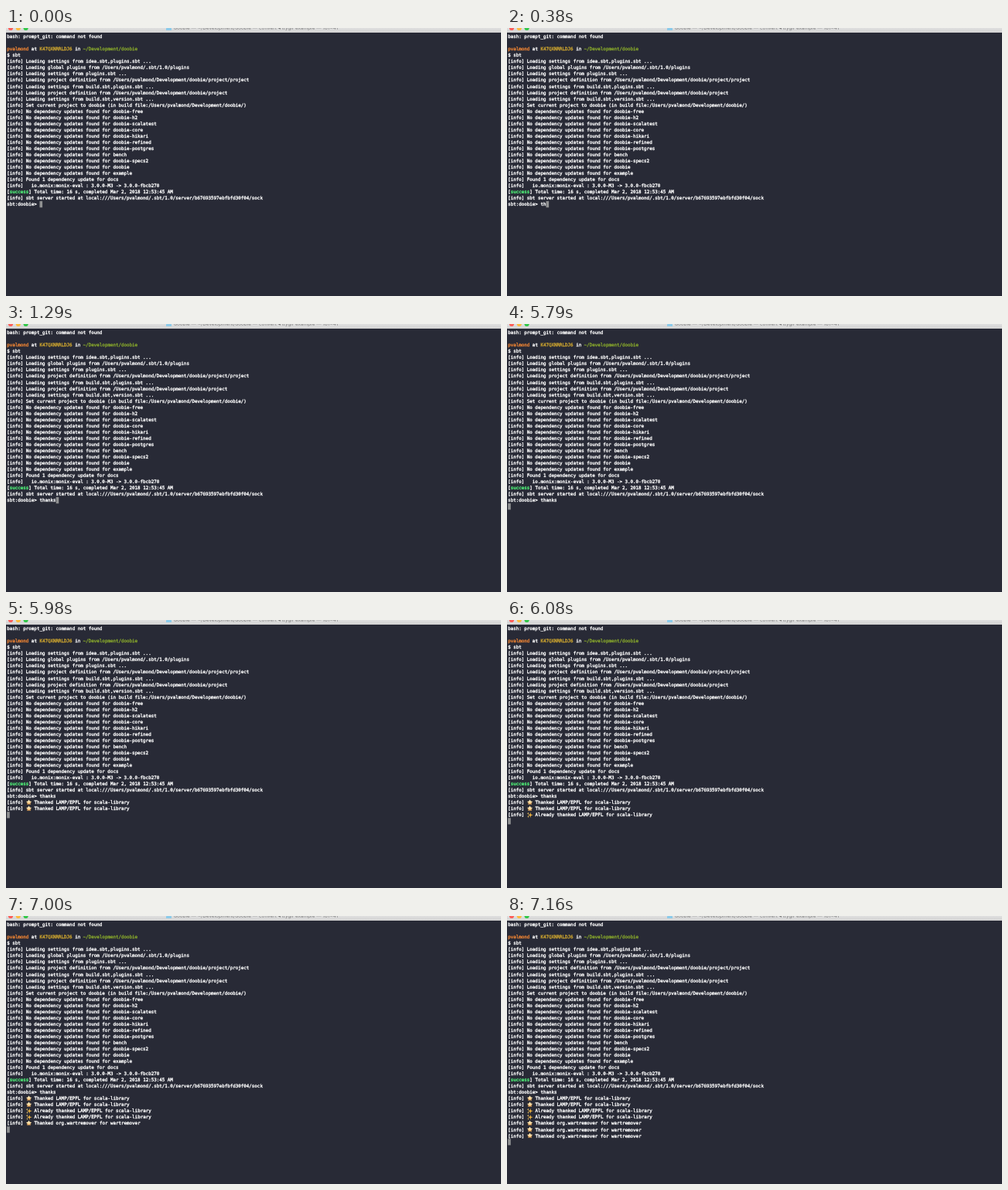
An HTML page that plays this animation: 640 px wide and 347 px high, repeating every 8000 ms.

```html
<!DOCTYPE html>
<html lang="en">
<head>
<meta charset="utf-8">
<title>Terminal session</title>
<style>
  html, body { margin: 0; width: 100%; height: 100%; overflow: hidden; background: #282a36; }
  svg { display: block; width: 640px; height: 347px; }
  text { white-space: pre; text-rendering: geometricPrecision; }
  .row { font: 5.855px "DejaVu Sans Mono", monospace; fill: #fff; stroke: #fff; stroke-width: .34px; }
  .title { font: 6.38px Inter, sans-serif; fill: #808080; }
</style>
</head>
<body>
<svg viewBox="0 0 640 347">
  <defs>
    <linearGradient id="bar" x2="0" y2="1">
      <stop offset="0" stop-color="#dfdfdf"/>
      <stop offset="1" stop-color="#d2d2d2"/>
    </linearGradient>
    <linearGradient id="glow" x2="0" y2="1">
      <stop offset=".3" stop-color="#fff3c4"/>
      <stop offset="1" stop-color="#eda04a"/>
    </linearGradient>
  </defs>
  <rect width="640" height="347" fill="#282a36"/>
  <rect width="640" height="6" fill="url(#bar)"/>
  <circle cx="6" r="3.1" fill="#fc605b"/>
  <circle cx="15.8" r="3.1" fill="#fdbc40"/>
  <circle cx="25.6" r="3.1" fill="#34c84a"/>
  <rect x="207" y="0" width="7" height="3" rx=".5" fill="#8ccbea"/>
  <text class="title" x="217" y="2.4">doobie — ~/Development/doobie — convert ◂ ttygif example — 181×41</text>
  <g id="screen"></g>
  <rect id="cursor" width="3.6" height="8.2" fill="#909192"/>
</svg>
<script>
const NS = 'http://www.w3.org/2000/svg';
const LOOP = 8000, LEFT = 1.2, TOP = 7.1, CELL = 3.525, PITCH = 8.04, PROMPT_ROW = 27;
const USER = 'pvalmond', HOST = 'K47QXNRRLDJ6';
const PROMPT = 'sbt:doobie> ', WORD = 'thanks';
const screen = document.getElementById('screen');
const cursor = document.getElementById('cursor');

const colX = col => LEFT + col * CELL;
const rowY = row => TOP + row * PITCH;

function add(parent, tag, attrs, content = '') {
  const el = document.createElementNS(NS, tag);
  for (const key in attrs) el.setAttribute(key, attrs[key]);
  el.textContent = content;
  return parent.appendChild(el);
}

// A row is a list of plain strings and [text, colour] pairs.
function addRow(parent, row, parts, col = 0) {
  const line = add(parent, 'text', { class: 'row', x: colX(col), y: rowY(row) + 6.1 });
  for (const part of parts) {
    if (typeof part === 'string') line.append(part);
    else add(line, 'tspan', { fill: part[1], stroke: part[1] }, part[0]);
  }
  return line;
}

function starPath(cx, cy, outer, inner, points) {
  const pts = [];
  for (let i = 0; i < points * 2; i++) {
    const r = i % 2 ? inner : outer, a = i * Math.PI / points - Math.PI / 2;
    pts.push((cx + r * Math.cos(a)).toFixed(2) + ',' + (cy + r * Math.sin(a)).toFixed(2));
  }
  return 'M' + pts.join('L') + 'Z';
}

function addIcon(parent, row, kind) {
  const x = colX(8.05), y = rowY(row) + 4;
  const star = (dx, dy, outer, inner, points, fill) =>
    add(parent, 'path', { d: starPath(x + dx, y + dy, outer, inner, points), fill });
  if (kind === 'glow') {
    star(0, 0, 3.7, 1.5, 10, '#b9803f');
    star(0, 0, 3.7, 1.9, 5, 'url(#glow)');
  } else {
    star(.7, .2, 3.4, 1, 4, '#f5b942');
    star(-2.3, -2, 1.6, .5, 4, '#f5c866');
    star(-2, 2.4, 1.5, .5, 4, '#f5c866');
  }
}

const loads = [
  'settings from idea.sbt,plugins.sbt ...',
  `global plugins from /Users/${USER}/.sbt/1.0/plugins`,
  'settings from plugins.sbt ...',
  `project definition from /Users/${USER}/Development/doobie/project/project`,
  'settings from build.sbt,plugins.sbt ...',
  `project definition from /Users/${USER}/Development/doobie/project`,
  'settings from build.sbt,version.sbt ...'
].map(s => 'Loading ' + s);
const modules = ['doobie-free', 'doobie-h2', 'doobie-scalatest', 'doobie-core', 'doobie-hikari',
  'doobie-refined', 'doobie-postgres', 'bench', 'doobie-specs2', 'doobie', 'example']
  .map(s => 'No dependency updates found for ' + s);
const info = s => ['[info] ' + s];

const history = [
  ['bash: prompt_git: command not found'],
  [],
  [[USER, '#ee8434'], ' at ', [HOST, '#cda52f'], ' in ', ['~/Development/doobie', '#86a62c']],
  ['$ sbt'],
  ...loads.map(info),
  info(`Set current project to doobie (in build file:/Users/${USER}/Development/doobie/)`),
  ...modules.map(info),
  info('Found 1 dependency update for docs'),
  info('  io.monix:monix-eval : 3.0.0-M3 -> 3.0.0-fbcb270'),
  ['[', ['success', '#50fa7b'], '] Total time: 16 s, completed Mar 2, 2018 12:53:45 AM'],
  info(`sbt server started at local:///Users/${USER}/.sbt/1.0/server/b67693597ebfbfd30f04/sock`)
];
history.forEach((parts, row) => addRow(screen, row, parts));
const promptLine = addRow(screen, PROMPT_ROW, [PROMPT]);

const scala = 'LAMP/EPFL for scala-library';
const wart = 'org.wartremover for wartremover';
const output = [
  [5890, 'glow', 'Thanked ' + scala],
  [5980, 'glow', 'Thanked ' + scala],
  [6080, 'spark', 'Already thanked ' + scala],
  [6900, 'spark', 'Already thanked ' + scala],
  [6900, 'glow', 'Thanked ' + wart],
  [7080, 'glow', 'Thanked ' + wart],
  [7160, 'glow', 'Thanked ' + wart]
].map(([at, icon, message], i) => {
  const row = PROMPT_ROW + 1 + i, group = add(screen, 'g', {});
  addRow(group, row, ['[info] ']);
  addIcon(group, row, icon);
  addRow(group, row, [message], 10);
  return { at, group, end: 10 + message.length };
});

const keyTimes = [110, 380, 690, 910, 1080, 1290];
const ENTER = 5790, NEWLINE = 7000;

function render(t) {
  const typed = keyTimes.filter(k => t >= k).length;
  promptLine.textContent = PROMPT + WORD.slice(0, typed);

  let shown = 0;
  for (const line of output) {
    const on = t >= line.at;
    line.group.setAttribute('visibility', on ? 'visible' : 'hidden');
    if (on) shown++;
  }

  let row = PROMPT_ROW, col = PROMPT.length + typed;
  if (t >= ENTER) {
    const waiting = t >= 6900 && t < NEWLINE;
    row = PROMPT_ROW + shown + (waiting ? 0 : 1);
    col = waiting ? output[shown - 1].end : 0;
  }
  cursor.setAttribute('x', colX(col));
  cursor.setAttribute('y', rowY(row));
}

const start = performance.now();
function tick() {
  render((performance.now() - start) % LOOP);
  requestAnimationFrame(tick);
}
tick();
</script>
</body>
</html>
```
